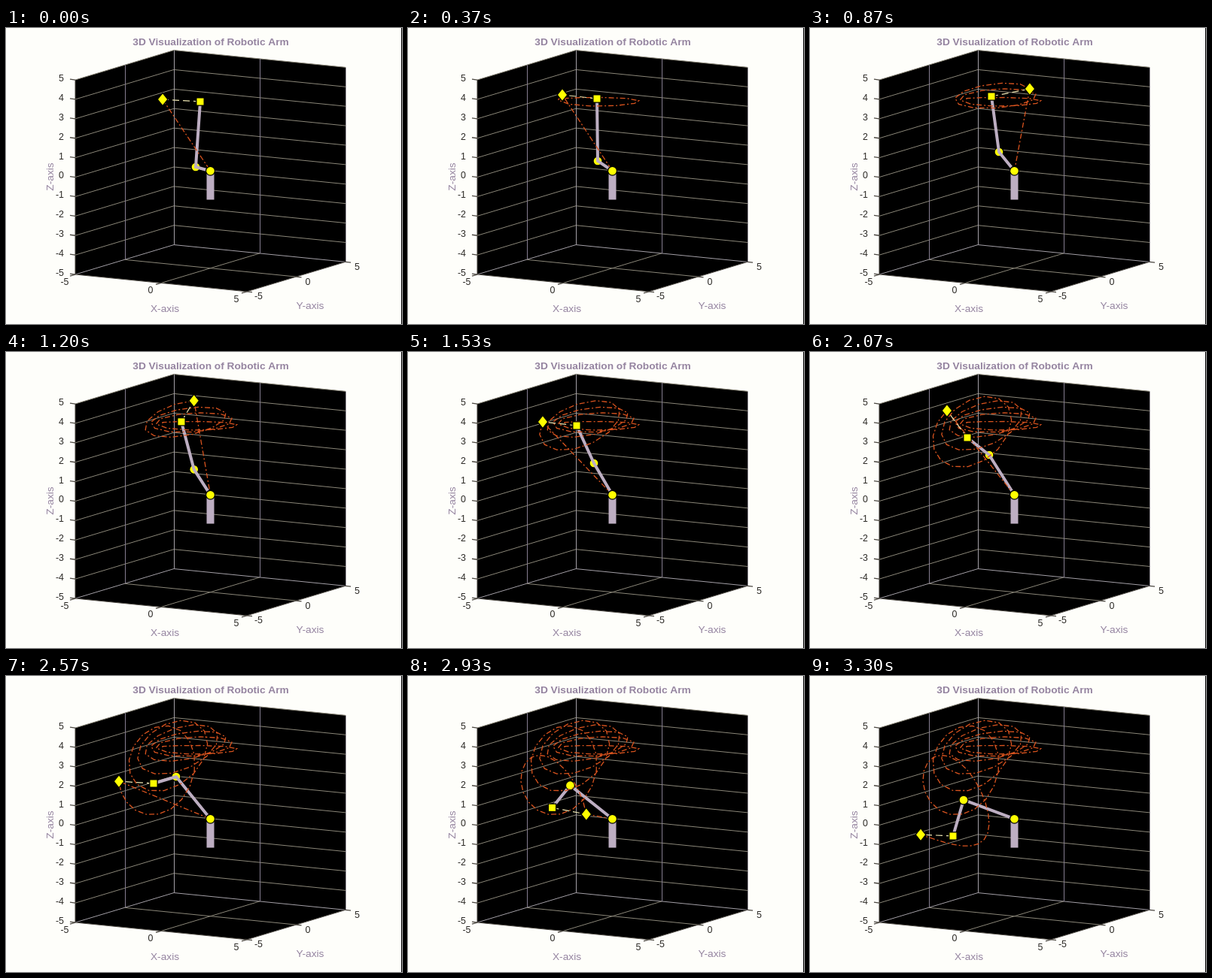
Recreate the animation shown at these times as an HTML page with a canvas. Size 526 by 394 pixels, loop 3330 ms.

```html
<!DOCTYPE html>
<html lang="en">
<head>
<meta charset="utf-8">
<title>3D Visualization of Robotic Arm</title>
<style>
html, body { margin: 0; width: 100%; height: 100%; overflow: hidden; background: #fefefa; }
canvas { display: block; }
</style>
</head>
<body>
<canvas id="stage" width="526" height="394"></canvas>
<script>
const ctx = document.getElementById('stage').getContext('2d');
const LOOP = 3330, LAST = 99, REACH = 52.6;
const ORIGIN = [271.5, 190.2];
const YELLOW = '#ffff00', ORANGE = '#d9531e', METAL = '#bdaec2';
const FONT = '"Liberation Sans", Arial, sans-serif';

// Orthographic view, azimuth 30 degrees, elevation 10 degrees.
const project = (x, y, z) => [
  ORIGIN[0] + 22.8 * x + 13.1 * y,
  ORIGIN[1] + 2.28 * x - 3.95 * y - 25.9 * z
];

// Natural cubic spline through (xs, ys).
function spline(xs, ys) {
  const n = xs.length, m = Array(n).fill(0), c = Array(n).fill(0);
  for (let i = 1; i < n - 1; i++) {
    const a = xs[i] - xs[i - 1], b = xs[i + 1] - xs[i];
    const rhs = 6 * ((ys[i + 1] - ys[i]) / b - (ys[i] - ys[i - 1]) / a);
    const d = 2 * (a + b) - a * c[i - 1];
    c[i] = b / d;
    m[i] = (rhs - a * m[i - 1]) / d;
  }
  for (let i = n - 2; i > 0; i--) m[i] -= c[i] * m[i + 1];
  return x => {
    let i = 0;
    while (i < n - 2 && x > xs[i + 1]) i++;
    const h = xs[i + 1] - xs[i], q = (x - xs[i]) / h, p = 1 - q;
    return p * ys[i] + q * ys[i + 1] +
      h * h / 6 * ((p * p * p - p) * m[i] + (q * q * q - q) * m[i + 1]);
  };
}

const steps = [0, 11, 26, 46, 62, 77, 99];
const track = (...values) => spline(steps, values);
const elbowX = track(252, 252, 251, 247, 238, 226, 204);
const elbowY = track(185, 177, 165, 148, 137, 134, 165);
const wristX = track(258, 251, 241, 224, 209, 196, 190);
const wristY = track(98, 94, 91, 98, 114, 143, 213);
const flatness = track(0.03, 0.216, 0.338, 0.66, 0.85, 0.863, 0.32);
const turns = track(-0.05, 1.081, 2.472, 4.118, 5.285, 6.299, 7.396);

// The tool circles the wrist in a plane across the forearm.
function pose(k) {
  const elbow = [elbowX(k), elbowY(k)], wrist = [wristX(k), wristY(k)];
  const dx = wrist[0] - elbow[0], dy = wrist[1] - elbow[1], len = Math.hypot(dx, dy);
  const ux = dx / len, uy = dy / len, angle = turns(k) * 2 * Math.PI;
  const across = -REACH * Math.cos(angle);
  const along = REACH * flatness(k) * Math.sin(angle);
  const tool = [wrist[0] - uy * across + ux * along, wrist[1] + ux * across + uy * along];
  return { elbow, wrist, tool };
}
const poses = Array.from({ length: LAST + 1 }, (_, k) => pose(k));

function line(points, color, width = 1, dash = []) {
  ctx.beginPath();
  points.forEach(p => ctx.lineTo(p[0], p[1]));
  ctx.strokeStyle = color;
  ctx.lineWidth = width;
  ctx.setLineDash(dash);
  ctx.stroke();
  ctx.setLineDash([]);
}

function text(str, x, y, color, size, weight = '', align = 'center') {
  ctx.font = `${weight} ${size}px ${FONT}`;
  ctx.textAlign = align;
  ctx.textBaseline = 'middle';
  ctx.fillStyle = color;
  ctx.fillText(str, x, y);
}

function marker(build) {
  ctx.beginPath();
  build();
  ctx.fillStyle = YELLOW;
  ctx.strokeStyle = '#000';
  ctx.lineWidth = 2.6;
  ctx.stroke();
  ctx.fill();
}
const dot = ([x, y]) => marker(() => ctx.arc(x, y, 5.3, 0, 7));
const square = ([x, y]) => marker(() => ctx.rect(x - 4.5, y - 4.5, 9, 9));
const diamond = ([x, y]) => marker(() => {
  ctx.moveTo(x, y - 7.5);
  ctx.lineTo(x + 6, y);
  ctx.lineTo(x, y + 7.5);
  ctx.lineTo(x - 6, y);
  ctx.closePath();
});

function drawAxes() {
  const grid = '#8a8678', upright = '#857d90', edge = '#a39fa6', frame = '#4a4640', ink = '#2c2a26';
  const label = '#9584a0';
  ctx.fillStyle = '#fefefa';
  ctx.fillRect(0, 0, 526, 394);
  ctx.fillStyle = '#000';
  ctx.fillRect(525, 0, 1, 394);

  ctx.beginPath();
  [[-5, -5, 5], [-5, 5, 5], [5, 5, 5], [5, 5, -5], [5, -5, -5], [-5, -5, -5]]
    .forEach(p => ctx.lineTo(...project(...p)));
  ctx.fill();

  const vertical = (x, y, color) => {
    const [px, top] = project(x, y, 5), [, bottom] = project(x, y, -5);
    const column = Math.round(px) + 0.5;
    line([[column, top], [column, bottom]], color);
  };
  for (let z = -5; z <= 5; z++) {
    line([project(-5, -5, z), project(-5, 5, z), project(5, 5, z)], z === -5 ? edge : grid);
  }
  vertical(-5, 0, upright);
  vertical(0, 5, upright);
  line([project(-5, 0, -5), project(5, 0, -5)], grid);
  line([project(0, -5, -5), project(0, 5, -5)], grid);
  vertical(-5, 5, edge);
  vertical(5, 5, edge);
  line([project(-5, -5, 5), project(-5, -5, -5), project(5, -5, -5), project(5, 5, -5)], frame);

  const tick = (p, dx, dy) => line([p, [p[0] + dx, p[1] + dy]], frame, 1.3);
  for (let z = -5; z <= 5; z++) {
    const p = project(-5, -5, z);
    tick(p, -7, -1);
    text(z, 77, p[1] - 1.5, ink, 12.4, '', 'right');
  }
  for (const v of [-5, 0, 5]) {
    const px = project(v, -5, -5), py = project(5, v, -5);
    tick(px, -7, 2);
    tick(py, 7, 0.8);
    text(v, px[0] - 14, px[1] + 10.5, ink, 12.4);
    text(v, py[0] + 15.5, py[1] + 7, ink, 12.4);
  }
  text('3D Visualization of Robotic Arm', 272, 19.5, label, 13.7, 'bold');
  text('X-axis', 211, 374, label, 13.7);
  text('Y-axis', 404, 370, label, 13.7);
  ctx.save();
  ctx.translate(59, 198);
  ctx.rotate(-Math.PI / 2);
  text('Z-axis', 0, 0, label, 13.7);
  ctx.restore();
}

function drawArm(k) {
  const { elbow, wrist, tool } = poses[k];
  const elbowInFront = k > 85;
  line([ORIGIN, project(0, 0, -1.48)], METAL, 10);
  if (!elbowInFront) dot(elbow);
  line([ORIGIN, elbow, wrist], METAL, 4);
  if (elbowInFront) dot(elbow);

  const trail = poses.slice(0, k + 1).map(p => p.tool);
  if (k < LAST) trail.push(ORIGIN);
  line(trail, ORANGE, 1.3, [7, 3, 2, 3]);
  line([wrist, tool], '#f0e8b4', 1.2, [9, 5]);

  dot(ORIGIN);
  square(wrist);
  diamond(tool);
}

function render(now) {
  const t = now % LOOP;
  const k = Math.min(LAST, Math.floor((Math.floor(t / 10) + 0.5) * 0.3));
  drawAxes();
  drawArm(k);
  requestAnimationFrame(render);
}
render(0);
</script>
</body>
</html>
```
